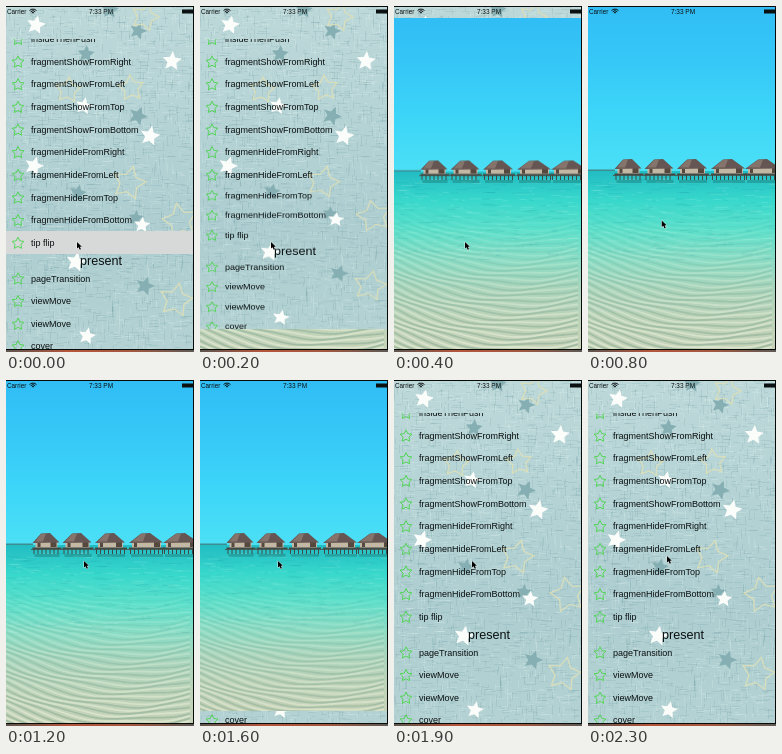
An HTML page with a canvas that plays this animation: 188x346 px, repeating every 2.4 s.

```html
<!DOCTYPE html>
<html lang="en">
<head>
<meta charset="utf-8">
<style>
html, body { margin: 0; width: 188px; height: 346px; overflow: hidden; background: #222; }
canvas { display: block; }
</style>
</head>
<body>
<canvas id="stage" width="188" height="346"></canvas>
<script>
const W = 188, H = 346, PAGE_W = 187, PAGE_H = 343, MID = 173, LOOP = 2400;
const FONT = '"Liberation Sans", Arial, sans-serif';
const ctx = document.getElementById('stage').getContext('2d');

function random(seed) {
  return () => (seed = seed * 16807 % 2147483647) / 2147483647;
}

function makePage(paint) {
  const page = document.createElement('canvas');
  page.width = PAGE_W;
  page.height = PAGE_H;
  paint(page.getContext('2d'));
  return page;
}

function blend(g, x0, y0, x1, y1, ...colors) {
  const fill = g.createLinearGradient(x0, y0, x1, y1);
  colors.forEach((c, i) => fill.addColorStop(i / (colors.length - 1), c));
  return fill;
}

function gradient(g, y0, y1, ...colors) {
  g.fillStyle = blend(g, 0, y0, 0, y1, ...colors);
  g.fillRect(0, y0, PAGE_W, y1 - y0);
}

function polygon(g, points) {
  g.beginPath();
  points.forEach(([x, y]) => g.lineTo(x, y));
  g.closePath();
}

function star(g, x, y, r, turn = 0, inner = 0.47) {
  polygon(g, Array.from({ length: 10 }, (_, i) => {
    const a = turn + i * Math.PI / 5 - Math.PI / 2;
    const d = i % 2 ? r * inner : r;
    return [x + d * Math.cos(a), y + d * Math.sin(a)];
  }));
}

function label(g, text, x, y, size, align = 'left') {
  g.font = `${size}px ${FONT}`;
  g.textAlign = align;
  g.textBaseline = 'alphabetic';
  g.fillStyle = '#0b1011';
  g.fillText(text, x, y);
}

function paintFabric(g) {
  const rnd = random(71);
  gradient(g, 0, PAGE_H, '#bdd8d9', '#b5d3d5', '#adcdd0', '#b4d2d3');
  for (let i = 0; i < 3000; i++) {
    g.fillStyle = rnd() < 0.5 ? 'rgba(240,250,248,.15)' : 'rgba(70,125,133,.12)';
    const across = rnd() < 0.6, len = 2 + rnd() * 9;
    g.fillRect(Math.floor(rnd() * PAGE_W), Math.floor(rnd() * PAGE_H), across ? len : 1, across ? 1 : len);
  }
  g.fillStyle = '#86afb3';
  [[132, 25, 9, .3], [104, 4, 9, .1], [80, 48, 9, .1], [132, 110, 10, .4],
   [72, 187, 9, .2], [130, 212, 8, .1], [139, 280, 10, .3]]
    .forEach(s => { star(g, ...s); g.fill(); });
  g.strokeStyle = '#d9deba';
  g.lineWidth = 1.3;
  [[139, 11, 14, .3], [62, 84, 13, .1], [125, 82, 13, -.1],
   [123, 177, 17, .25], [174, 215, 18, -.2], [170, 294, 17, .2]]
    .forEach(s => { star(g, ...s, .53); g.stroke(); });
  g.fillStyle = '#fbfdfb';
  [[30, 19, 10, .2], [166, 55, 10, .1], [78, 100, 9, .2], [144, 130, 10.5, .2],
   [28, 160, 10, .3], [70, 256, 10.5, .2], [136, 219, 8.5, .1], [81, 330, 9, .2]]
    .forEach(s => { star(g, ...s); g.fill(); });
}

function paintList(g, selected) {
  const rows = ['insideThenPush', 'fragmentShowFromRight', 'fragmentShowFromLeft',
    'fragmentShowFromTop', 'fragmentShowFromBottom', 'fragmenHideFromRight',
    'fragmenHideFromLeft', 'fragmenHideFromTop', 'fragmenHideFromBottom', 'tip flip',
    'pageTransition', 'viewMove', 'viewMove', 'cover'];
  paintFabric(g);
  g.save();
  g.beginPath();
  g.rect(0, 33, PAGE_W, PAGE_H);
  g.clip();
  if (selected) {
    g.fillStyle = '#d7d9d8';
    g.fillRect(0, 225, PAGE_W, 23);
  }
  rows.forEach((text, i) => {
    const y = i < 10 ? 33 + i * 22.65 : 272.5 + (i - 10) * 22.65;
    g.strokeStyle = '#55d558';
    g.lineWidth = 1;
    star(g, 12, y + .5, 6.2, 0, .5);
    g.stroke();
    label(g, text, 25, Math.round(y + 3), 9);
  });
  label(g, 'present', 95, 259, 12.6, 'center');
  g.restore();
}

function paintHut(g, x, w) {
  const l = x - w / 2, r = x + w / 2;
  g.fillStyle = '#c3b8a4';
  g.fillRect(l + 3, 161, w - 5, 7);
  g.fillStyle = '#54483f';
  g.fillRect(l + 5, 163, 3, 4);
  g.fillRect(r - 9, 162, 6, 5);
  g.fillStyle = '#665653';
  polygon(g, [[l, 163], [x - 5, 153.5], [x + 4, 153], [r, 162.5]]);
  g.fill();
  g.fillStyle = '#85746c';
  polygon(g, [[l + 3, 161.5], [x - 5, 154], [x, 153.5], [x - 3, 161.5]]);
  g.fill();
  g.fillStyle = '#3f4a46';
  g.fillRect(l, 167.5, w + 2, 1.5);
  for (let s = l + 1; s < r; s += 4) g.fillRect(s, 168, 1, 6);
  g.fillStyle = 'rgba(25,110,105,.4)';
  g.fillRect(l + 2, 174, w - 2, 3);
}

function paintBeach(g) {
  const rnd = random(19);
  gradient(g, 0, 165, '#31bdf5', '#36c8f7', '#3dd6f8', '#4ce0f6');
  gradient(g, 165, PAGE_H, '#22bcc3', '#38d8cc', '#5ce0cb', '#8bdcc5', '#abd4bc', '#bdd3b9', '#c5d2b8');
  g.fillStyle = '#3f8c91';
  g.fillRect(0, 163.5, 27, 1.5);
  for (let i = 0; i < 260; i++) {
    g.fillStyle = rnd() < .5 ? 'rgba(0,135,145,.12)' : 'rgba(205,255,240,.15)';
    g.fillRect(rnd() * PAGE_W - 4, 168 + rnd() * 85, 3 + rnd() * 11, 1);
  }
  // Sand ripples grow stronger towards the viewer.
  const light = blend(g, 0, 195, 0, PAGE_H, 'rgba(245,250,228,0)', 'rgba(245,250,228,.45)');
  const dark = blend(g, 0, 195, 0, PAGE_H, 'rgba(80,135,110,0)', 'rgba(80,135,110,.3)');
  for (let i = 0; i < 70; i++) {
    g.strokeStyle = i % 2 ? light : dark;
    g.lineWidth = 1.8;
    g.beginPath();
    for (let x = 0; x <= PAGE_W; x += 4)
      g.lineTo(x, 160 + i * 3.1 + x * .48 - x * x * .0019 + Math.sin(x / 13 + i * .8) * 1.2);
    g.stroke();
  }
  g.fillStyle = '#46605a';
  g.fillRect(25, 169, PAGE_W - 25, 1);
  [[40, 27], [71, 29], [104, 30], [140, 34], [175, 36]].forEach(h => paintHut(g, ...h));
}

const list = makePage(g => paintList(g, false));
const pressed = makePage(g => paintList(g, true));
const beach = makePage(paintBeach);

// Draws the upper or lower half of a page, squeezed towards the hinge.
function half(page, upper, scale = 1) {
  const top = upper ? 0 : MID, h = upper ? MID : PAGE_H - MID;
  const size = h * scale;
  if (size > .2) ctx.drawImage(page, 0, top, PAGE_W, h, 0, upper ? MID - size : MID, PAGE_W, size);
}

function flip(from, to, progress) {
  const turn = Math.cos(progress * Math.PI);
  half(from, true);
  half(to, false);
  if (turn > 0) half(from, false, turn);
  else half(to, true, -turn);
}

const clamp = v => Math.min(1, Math.max(0, v));
const ease = v => (1 - Math.cos(Math.PI * clamp(v))) / 2;
const mix = (a, b, v) => a + (b - a) * v;

function statusBar() {
  label(ctx, 'Carrier', 1, 8, 6.3);
  label(ctx, '7:33 PM', 95, 8, 6.5, 'center');
  ctx.strokeStyle = '#0b1011';
  ctx.lineWidth = 1;
  for (const r of [1.5, 3.2, 4.9]) {
    ctx.beginPath();
    ctx.arc(27, 8, r, -Math.PI * .75, -Math.PI * .25);
    ctx.stroke();
  }
  ctx.fillStyle = '#0b1011';
  ctx.fillRect(176, 3.5, 11, 4);
}

function pointer(t) {
  const away = ease((t - 500) / 700), drift = ease((t - 1900) / 400);
  const x = mix(71, 78, away) + drift, y = mix(236, 181, away) - 5 * drift;
  polygon(ctx, [[0, 0], [0, 6.5], [1.6, 5.2], [2.7, 7.8], [4, 7.2], [2.9, 4.8], [4.9, 4.7]]
    .map(([px, py]) => [x + px, y + py]));
  ctx.strokeStyle = 'rgba(255,255,255,.8)';
  ctx.lineWidth = 1;
  ctx.stroke();
  ctx.fillStyle = '#000';
  ctx.fill();
}

function frameEdge() {
  ctx.fillStyle = '#080a0a';
  ctx.fillRect(PAGE_W, 0, 1, H);
  ctx.fillRect(0, 0, W, 1);
  ctx.fillRect(0, PAGE_H, W, 1);
  ctx.fillStyle = blend(ctx, 0, 0, W, 0, '#5d564f', '#b5563c', '#a3583f', '#5d5a55');
  ctx.fillRect(0, PAGE_H + 1, W, 2);
}

function draw(now) {
  const t = Math.floor(now % LOOP / 100) * 100;
  if (t < 1500) flip(t < 100 ? pressed : list, beach, ease((t - 100) / 387));
  else flip(beach, list, ease((t - 1513) / 387));
  frameEdge();
  statusBar();
  pointer(t);
}

const start = performance.now();
function tick() {
  draw(performance.now() - start);
  requestAnimationFrame(tick);
}
tick();
</script>
</body>
</html>
```
